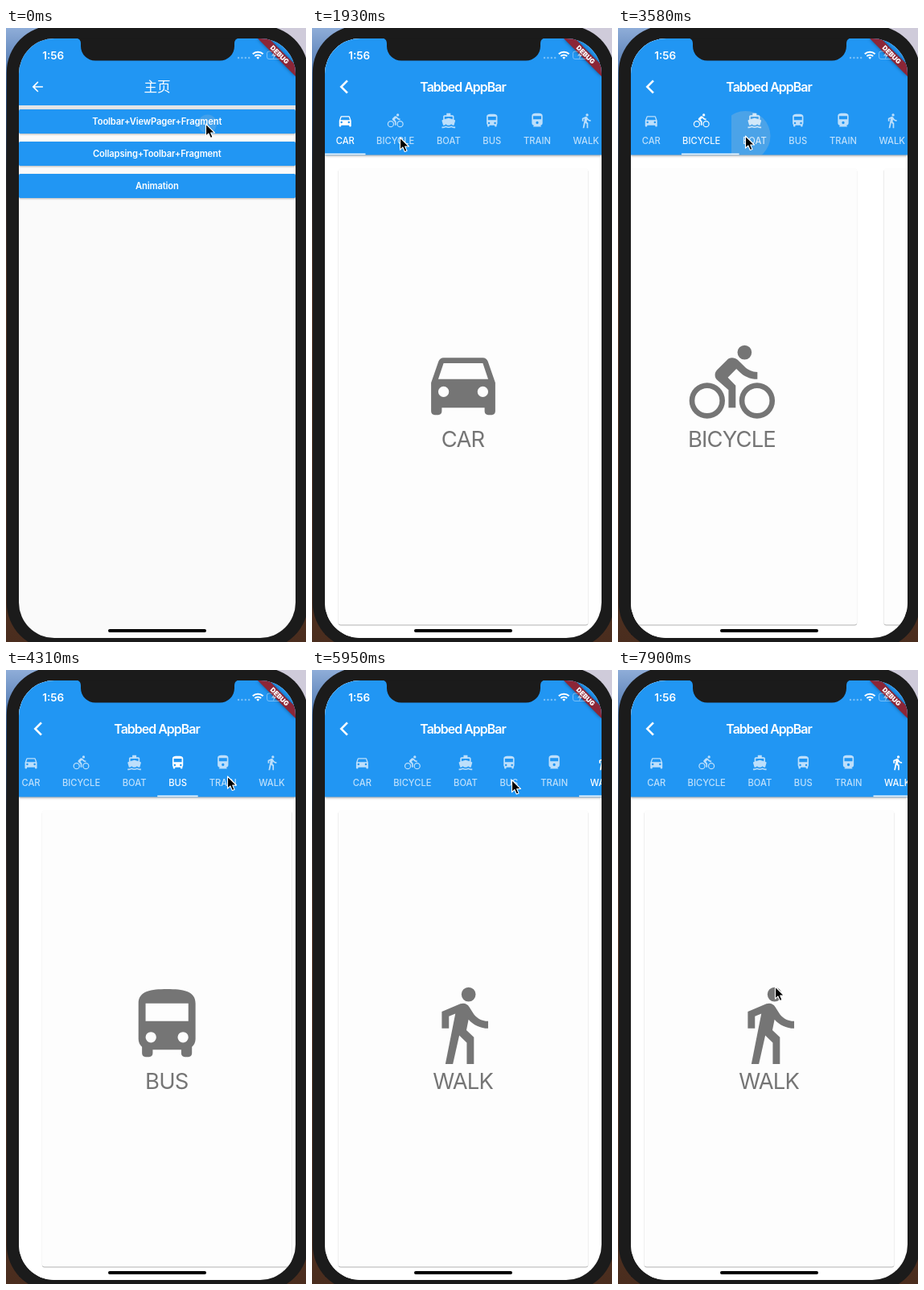
An HTML page that plays this animation: 373x762 px, repeating every 8000 ms.

```html
<!DOCTYPE html>
<html lang="en">
<head>
<meta charset="utf-8">
<title>Tabbed app bar</title>
<style>
  html, body { margin: 0; width: 100%; height: 100%; overflow: hidden; background: #1b1b1b; }
  #stage { display: block; width: 373px; height: 762px; }
  text { font-family: Inter, "Liberation Sans", sans-serif; text-anchor: middle; fill: #fff; }
  .label { font-size: 11.2px; font-weight: 500; }
  .button { font-size: 11.2px; font-weight: 600; letter-spacing: -.15px; }
  .title { font-size: 15.9px; font-weight: 600; letter-spacing: -.95px; }
  .cjk { font: 500 16.6px "Noto Sans CJK SC", "Noto Sans CJK", sans-serif; }
  .big { font-size: 27.4px; letter-spacing: -.85px; fill: #757575; }
  .bar { filter: drop-shadow(0 1.6px 1.6px rgba(0, 0, 0, .4)); }
  .raised { filter: drop-shadow(0 1.3px 1.1px rgba(0, 0, 0, .28)); }
  .card { filter: drop-shadow(.3px 1px .7px rgba(0, 0, 0, .3)); }
  .banner { filter: drop-shadow(0 0 2px rgba(0, 0, 0, .45)); }
</style>
</head>
<body>
<svg id="stage" viewBox="0 0 373 762">
  <defs>
    <linearGradient id="wall" x2="0" y2="1">
      <stop offset="0" stop-color="#8fadd8"/>
      <stop offset=".1" stop-color="#34619f"/>
      <stop offset=".24" stop-color="#2a2a2e"/>
      <stop offset=".42" stop-color="#6b4330"/>
      <stop offset="1" stop-color="#4a2d1e"/>
    </linearGradient>
    <linearGradient id="edge">
      <stop offset="0" stop-color="#000" stop-opacity="0"/>
      <stop offset="1" stop-color="#000" stop-opacity=".16"/>
    </linearGradient>
    <clipPath id="screen"><rect x="16" y="13" width="344" height="744" rx="44"/></clipPath>
    <clipPath id="body"><rect x="16" y="157" width="344" height="600"/></clipPath>
  </defs>

  <rect width="373" height="762" fill="url(#wall)"/>
  <path d="M320 0h53v60z" fill="#cfcbda"/>
  <rect x=".8" y="-3" width="375" height="774" rx="58" fill="#1b1b1b"/>

  <g clip-path="url(#screen)">
    <g id="home">
      <rect x="16" y="13" width="344" height="744" fill="#fafafa"/>
      <rect class="raised" x="16" y="13" width="344" height="83" fill="#2196f3"/>
      <rect x="16" y="96" width="344" height="5" fill="#e2e4e6"/>
      <path transform="translate(29.3 63) scale(.83)" fill="#fff"
        d="M20 11H7.83l5.59-5.59L12 4l-8 8 8 8 1.41-1.41L7.83 13H20v-2z"/>
      <text class="cjk" x="188" y="79">主页</text>
      <g id="buttons"></g>
    </g>

    <g id="tabbed">
      <rect x="4" y="13" width="12" height="744" fill="url(#edge)"/>
      <rect x="16" y="13" width="344" height="744" fill="#fff"/>
      <g clip-path="url(#body)"><g id="pages"></g></g>
      <rect class="bar" x="16" y="13" width="344" height="144.500" fill="#2196f3"/>
      <path transform="translate(34.8 63) scale(.83)" fill="#fff" stroke="#fff" stroke-width=".8"
        d="M11.67 3.87L9.9 2.1 0 12l9.9 9.9 1.77-1.77L3.54 12z"/>
      <text class="title" x="187.6" y="78.5">Tabbed AppBar</text>
      <svg x="16" y="96" width="344" height="61.500" viewBox="16 96 344 61.500">
        <g id="tabs"></g>
        <rect id="line" y="155.7" height="1.8" fill="#fff"/>
      </svg>
    </g>

    <path class="banner" d="M313 13h14l33 33v14z" fill="#8c2637"/>
    <text transform="translate(340.3 33) rotate(45)" y="3" font-size="8.2" font-weight="900">DEBUG</text>
    <rect x="127" y="746" width="122" height="4" rx="2" fill="#000"/>
  </g>

  <path fill="#1b1b1b" d="M87 12.500q6 .500 6 7v3a18 18 0 0 0 18 18h155a18 18 0 0 0 18-18v-3q0-6.500 6-7z"/>
  <text x="58.7" y="38.5" font-size="13.5" font-weight="600">1:56</text>
  <path d="M289 37h14" stroke="#fff" stroke-opacity=".4" stroke-width="2.4" stroke-linecap="round" stroke-dasharray="0 4.4"/>
  <g fill="none" stroke="#fff" stroke-width="2">
    <path d="M306.800 32.300a9 9 0 0 1 12.800 0M309.300 35a5.500 5.500 0 0 1 7.800 0"/>
    <path d="M313.200 38.800l-1.900-2a2.700 2.700 0 0 1 3.800 0z" fill="#fff" stroke="none"/>
  </g>
  <g fill="none" stroke="#fff" stroke-opacity=".38">
    <rect x="324.5" y="29" width="17" height="9.5" rx="2.5"/>
    <path d="M343.500 32v3.500"/>
    <path d="M334 29.500l-4 5h3l-1 4 4-5.500h-3z" fill="#fff" fill-opacity=".6" stroke="none"/>
  </g>

  <g id="cursor">
    <path d="M0 0V15.200L3.400 12 5.800 17.500 8.500 16.400 6.200 11H11Z"
      fill="#000" stroke="#fff" stroke-width="1.1" stroke-linejoin="round"/>
  </g>
</svg>

<script>
const LOOP = 8000, STEP = 149, WIDTH = 344, MAX_SCROLL = 10.6;
const NS = 'http://www.w3.org/2000/svg';
const $ = id => document.getElementById(id);

function add(parent, tag, attrs, text) {
  const el = document.createElementNS(NS, tag);
  set(el, attrs || {});
  if (text) el.textContent = text;
  parent.append(el);
  return el;
}

function set(el, attrs) {
  for (const key in attrs) el.setAttribute(key, attrs[key]);
}

function move(el, x, y = 0) {
  el.setAttribute('transform', `translate(${x} ${y})`);
}

const disc = (x, y, r) => `M${x - r} ${y}a${r} ${r} 0 1 0 ${2 * r} 0a${r} ${r} 0 1 0 ${-2 * r} 0z`;
const wheel = x => disc(x, 17, 5) + disc(x, 17, 3.5);

const modes = [
  ['CAR', 'M18.92 6.01C18.72 5.42 18.16 5 17.5 5h-11c-.66 0-1.21.42-1.42 1.01L3 12v8c0 .55.45 1 1 1h1c.55 0 1-.45 1-1v-1h12v1c0 .55.45 1 1 1h1c.55 0 1-.45 1-1v-8l-2.08-5.99zM5 11l1.5-4.5h11L19 11H5z'
    + disc(6.5, 14.5, 1.5) + disc(17.5, 14.5, 1.5)],
  ['BICYCLE', 'M10.8 10.5l2.4-2.4.8.8c1.3 1.3 3 2.1 5.1 2.1V9c-1.5 0-2.7-.6-3.6-1.5l-1.9-1.9c-.5-.4-1-.6-1.6-.6s-1.1.2-1.4.6L7.8 8.4c-.4.4-.6.9-.6 1.4 0 .6.2 1.1.6 1.4L11 14v5h2v-6.2l-2.2-2.3z'
    + disc(15.5, 3.5, 2) + wheel(5) + wheel(19)],
  ['BOAT', 'M20 21c-1.39 0-2.78-.47-4-1.32-2.44 1.71-5.56 1.71-8 0C6.78 20.53 5.39 21 4 21H2v2h2c1.38 0 2.74-.35 4-.99 2.52 1.29 5.48 1.29 8 0 1.26.65 2.62.99 4 .99h2v-2h-2zM3.95 19H4c1.6 0 3.02-.88 4-2 .98 1.12 2.4 2 4 2s3.02-.88 4-2c.98 1.12 2.4 2 4 2h.05l1.89-6.68c.08-.26.06-.54-.06-.78s-.34-.42-.6-.5L20 10.62V6c0-1.1-.9-2-2-2h-3V1H9v3H6c-1.1 0-2 .9-2 2v4.62l-1.29.42c-.26.08-.48.26-.6.5s-.15.52-.06.78L3.95 19zM6 6h12v3.97L12 8 6 9.97V6z'],
  ['BUS', 'M4 16c0 .88.39 1.67 1 2.22V20c0 .55.45 1 1 1h1c.55 0 1-.45 1-1v-1h8v1c0 .55.45 1 1 1h1c.55 0 1-.45 1-1v-1.78c.61-.55 1-1.34 1-2.22V6c0-3.5-3.58-4-8-4s-8 .5-8 4v10zM18 11H6V6h12v5z'
    + disc(7.5, 15.5, 1.5) + disc(16.5, 15.5, 1.5)],
  ['TRAIN', 'M4 15.5C4 17.43 5.57 19 7.5 19L6 20.5v.5h12v-.5L16.5 19c1.93 0 3.5-1.57 3.5-3.5V5c0-3.5-3.58-4-8-4s-8 .5-8 4v10.5zM18 10H6V5h12v5z'
    + disc(12, 15, 2)],
  ['WALK', 'M9.8 8.9L7 23h2.1l1.8-8 2.1 2v6h2v-7.5l-2.1-2 .6-3C14.8 12 16.8 13 19 13v-2c-1.9 0-3.5-1-4.3-2.4l-1-1.6c-.4-.6-1-1-1.7-1-.3 0-.5.1-.8.1L6 8.3V13h2V9.6l1.8-.7z'
    + disc(13.5, 3.5, 2)]
];
const edges = [16, 66.5, 141, 198.6, 249, 311, 370.6];

function icon(parent, d, x, y, scale, fill) {
  add(parent, 'path', {
    d, fill, 'fill-rule': 'evenodd',
    transform: `translate(${x - 12 * scale} ${y - 12 * scale}) scale(${scale})`
  });
}

// A nested svg clips its content, such as a touch ripple
function inkBox(parent, x, y, width, height) {
  const box = add(parent, 'svg', { x, y, width, height, viewBox: `${x} ${y} ${width} ${height}` });
  return { box, ripple: add(box, 'circle', { fill: '#c8c8c8' }) };
}

const buttons = ['Toolbar+ViewPager+Fragment', 'Collapsing+Toolbar+Fragment', 'Animation'].map((name, i) => {
  const y = 101 + 40 * i;
  add($('buttons'), 'rect', { class: 'raised', x: 16, y, width: WIDTH, height: 30, rx: 1.7, fill: '#2196f3' });
  const ink = inkBox($('buttons'), 16, y, WIDTH, 30);
  add(ink.box, 'text', { class: 'button', x: 187.8, y: y + 18.7 }, name);
  return ink;
});

const tabs = modes.map(([name, d], i) => {
  const x = edges[i], width = edges[i + 1] - x, mid = x + width / 2;
  const { box, ripple } = inkBox($('tabs'), x, 96, width, 61.5);
  const face = add(box, 'g');
  icon(face, d, mid, 115, .831, '#fff');
  add(face, 'text', { class: 'label', x: mid, y: 144 }, name);

  const page = add($('pages'), 'g', { transform: `translate(${i * WIDTH} 0)` });
  add(page, 'rect', { class: 'card', x: 32.7, y: 174, width: 310.6, height: 566.4, rx: 3, fill: '#fdfdfd' });
  icon(page, d, 188, 440.3, 4.433, '#757575');
  add(page, 'text', { class: 'big', x: 187.6, y: 520 }, name);
  return { ripple, face };
});

// Steps at which the next tab is tapped, and the drag of the tab bar
const taps = [18, 24, 28, 30, 33];
const GRAB = 37, RELEASE = 49;

// Pointer moves: from step, to step, x, y
const moves = [
  [0, 0, 248.5, 119], [8, 10, 113, 140], [11, 13, 109.5, 136], [20, 22, 158.5, 134],
  [27, 28, 222, 134], [28, 29, 275.5, 132], [31, 33, 335, 135],
  [35, GRAB, 192, 146], [GRAB, 40, 248.5, 136.5], [40, 41, 262, 136], [41, 45, 180, 139],
  [45, 47, 292.5, 117], [47, RELEASE, 308, 117], [50, 53, 195.5, 393]
];

const clamp = v => Math.max(0, Math.min(1, v));
const easeOut = v => 1 - (1 - clamp(v)) ** 3;
const rubber = d => 62 * d / (d + 89);

function pointerAt(n) {
  return moves.reduce(([px, py], [from, to, x, y]) => {
    const k = to > from ? clamp((n - from) / (to - from)) : 1;
    return [px + (x - px) * k, py + (y - py) * k];
  }, [0, 0]);
}

const pageAt = n => taps.reduce((sum, tap) => sum + easeOut(n < tap ? 0 : (n - tap + .075) / 1.6), 0);

// The bar follows the finger and resists past either end
function dragScroll(x) {
  const pull = x - 202.5;
  if (pull > 0) return -rubber(pull);
  return -pull < MAX_SCROLL ? -pull : MAX_SCROLL + rubber(-pull - MAX_SCROLL);
}

function scrollAt(n) {
  if (n < GRAB) return MAX_SCROLL * clamp(pageAt(n) - 2);
  const held = Math.min(n, RELEASE);
  return dragScroll(pointerAt(held)[0]) * .663 ** (n - held);
}

function draw(time) {
  const n = Math.floor((time + 12) / STEP);
  const push = easeOut((n - 1) / 4);
  const page = pageAt(n), shift = scrollAt(n);
  const [x, y] = pointerAt(n);

  move($('home'), -push * WIDTH / 3);
  move($('tabbed'), (1 - push) * (WIDTH + 12));
  set(buttons[0].ripple, { cx: x + 2, cy: y, r: 11.5 + 50 * n, opacity: .2 * clamp(1 - n / 3) });

  move($('pages'), -page * WIDTH);
  move($('tabs'), -shift);

  // The indicator runs slightly ahead of the page
  const mark = Math.min(Math.ceil(page), page + .033);
  const i = Math.min(Math.floor(mark), modes.length - 2), k = mark - i;
  const mix = j => edges[j] + (edges[j + 1] - edges[j]) * k;
  set($('line'), { x: mix(i) - shift, width: mix(i + 1) - mix(i) });

  const tapped = taps.indexOf(n) + 1;
  tabs.forEach(({ ripple, face }, t) => {
    face.setAttribute('opacity', .7 + .3 * clamp(1 - Math.abs(t - mark)));
    set(ripple, { cx: x + shift, cy: y, r: tapped && t === tapped ? 31 : 0, opacity: .25 });
  });

  move($('cursor'), x, y);
}

function tick() {
  draw(performance.now() % LOOP);
  requestAnimationFrame(tick);
}
tick();
</script>
</body>
</html>
```
